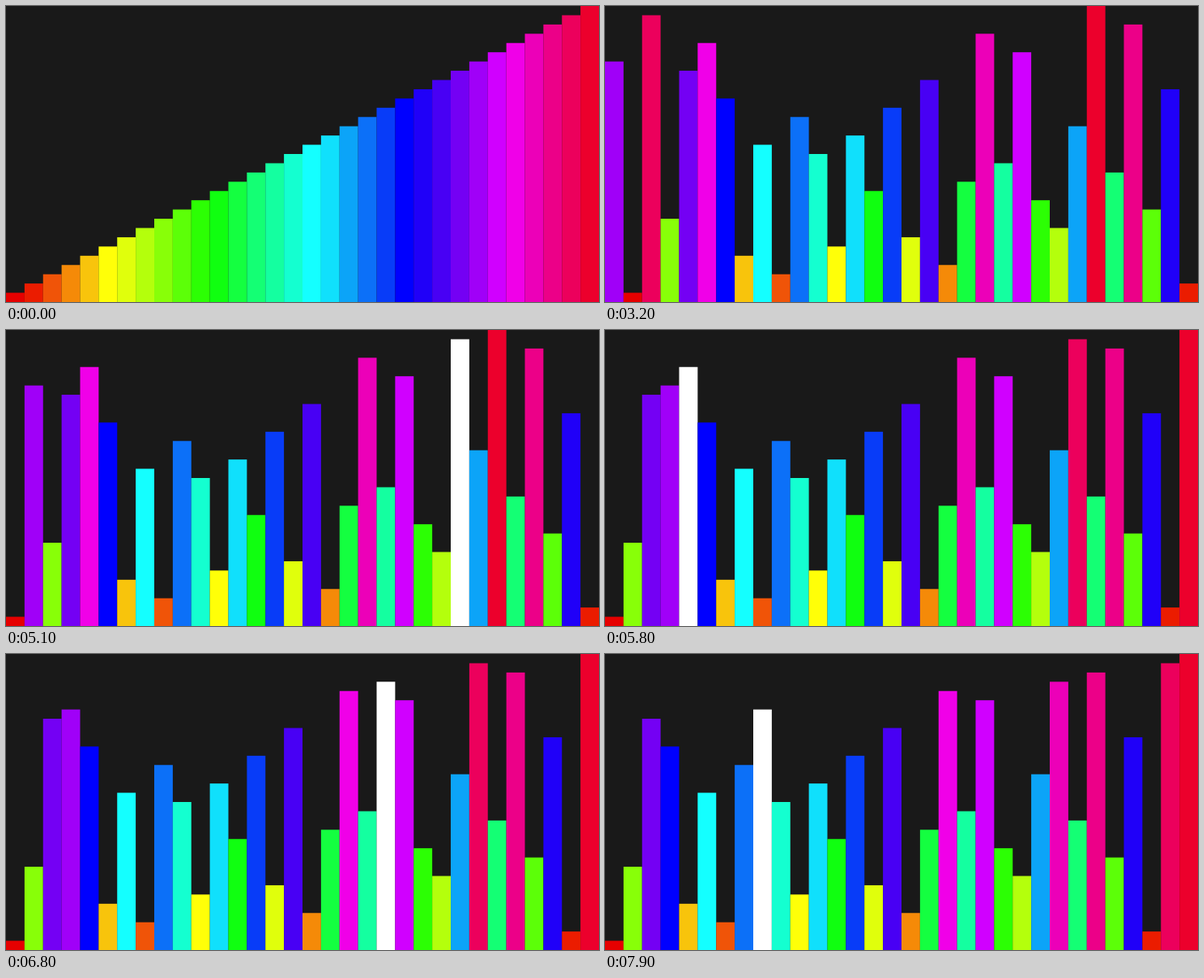
Write an HTML page with a canvas that moves like this. It is 732 px wide and 366 px high and loops after 8000 ms.

```html
<!DOCTYPE html>
<html lang="en">
<head>
<meta charset="utf-8">
<title>Bubble sort</title>
<style>
  html, body { margin: 0; width: 100%; height: 100%; overflow: hidden; background: #191919; }
  canvas { display: block; }
</style>
</head>
<body>
<canvas id="stage" width="732" height="366"></canvas>
<script>
const ctx = document.getElementById('stage').getContext('2d');
const W = 732, H = 366, COUNT = 32;
const LOOP = 8000, TICK = 100, SHUFFLE_AT = 1600, SORT_AT = 3800;
const STEPS_PER_TICK = 1.635, FIRST_STEP = 2.79;

const sorted = Array.from({ length: COUNT }, (_, i) => i + 1);
const shuffled = [
  26, 1, 31, 9, 25, 28, 22, 5, 17, 3, 20, 16, 6, 18, 12, 21,
  7, 24, 4, 13, 29, 15, 27, 11, 8, 19, 32, 14, 30, 10, 23, 2
];

// Rainbow from the shortest bar to the tallest
const colors = (
  'e60000 eb1c00 f05408 f58a08 f8c40c ffff08 e0ff0c b4ff0c ' +
  '88ff08 5cff08 2cff04 10ff10 14ff40 14ff74 14ffa0 14ffd0 ' +
  '14ffff 10e0fc 0ca4f8 0c70f8 083cf8 0000ff 2000f8 4800f4 ' +
  '7400f4 a000f8 d000ff f000e8 ec00b8 ec0088 ec005c ec002c'
).split(' ').map(c => '#' + c);

// Bubble sort stopped after a number of comparisons
function sortFor(steps) {
  const bars = shuffled.slice();
  let active = -1;
  for (let end = COUNT - 1; end > 0; end--) {
    for (let i = 1; i <= end; i++) {
      if (steps-- <= 0) return { bars, active };
      if (bars[i - 1] > bars[i]) [bars[i - 1], bars[i]] = [bars[i], bars[i - 1]];
      active = i;
    }
  }
  return { bars, active };
}

function stateAt(time) {
  if (time < SHUFFLE_AT) return { bars: sorted, active: -1 };
  if (time < SORT_AT) return { bars: shuffled, active: -1 };
  const ticks = Math.floor((time - SORT_AT) / TICK);
  return sortFor(Math.floor(FIRST_STEP + ticks * STEPS_PER_TICK));
}

function draw(time) {
  const { bars, active } = stateAt(time);
  const barW = W / COUNT, unit = H / COUNT;
  ctx.fillStyle = '#191919';
  ctx.fillRect(0, 0, W, H);
  bars.forEach((value, i) => {
    ctx.fillStyle = i === active ? '#fff' : colors[value - 1];
    ctx.fillRect(i * barW, H - value * unit, barW, value * unit);
  });
}

const start = performance.now();
function frame() {
  draw((performance.now() - start) % LOOP);
  requestAnimationFrame(frame);
}
frame();
</script>
</body>
</html>
```
